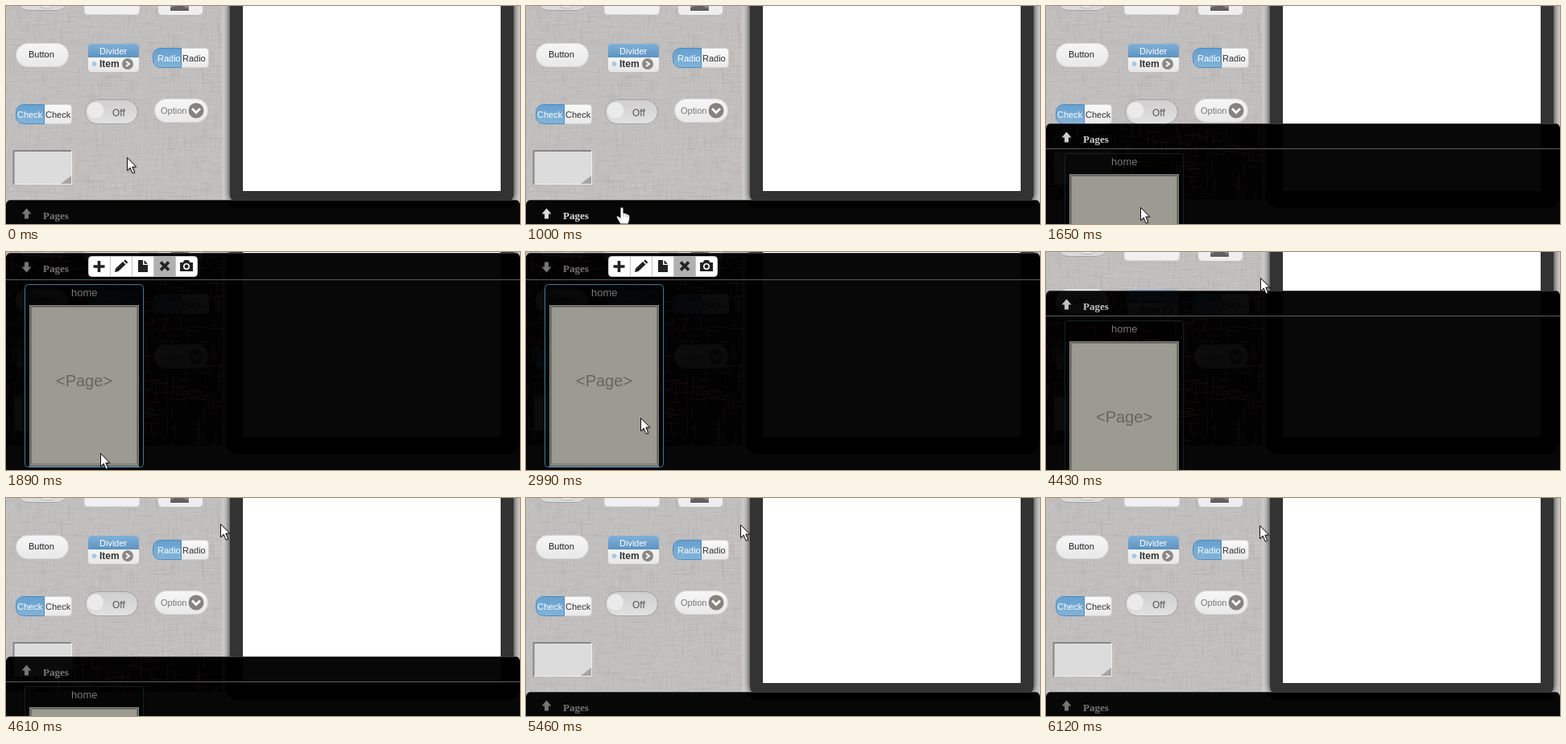
These frames come from a looping animation (638x271 px, 6180 ms). An HTML page with a canvas:

```html
<!DOCTYPE html>
<html lang="en">
<head>
<meta charset="utf-8">
<title>Pages drawer</title>
<style>
html, body { margin: 0; width: 100%; height: 100%; overflow: hidden; background: #000; }
canvas { display: block; }
</style>
</head>
<body>
<canvas id="stage" width="638" height="271"></canvas>
<script>
const W = 638, H = 271, LOOP = 6180, STEP = 60;
const SANS = '"Liberation Sans", Arial, sans-serif';
const SERIF = '"Liberation Serif", Times, serif';
const clamp = v => Math.max(0, Math.min(1, v));
const ramp = (t, start, length) => clamp((t - start) / length);
const swing = u => 0.5 - Math.cos(Math.PI * u) / 2;

function randomizer(seed) {
  return () => (seed = (seed * 16807) % 2147483647) / 2147483647;
}

function layer(draw) {
  const canvas = document.createElement('canvas');
  canvas.width = W;
  canvas.height = H;
  draw(canvas.getContext('2d'));
  return canvas;
}

function box(c, x, y, w, h, r, fill, stroke) {
  c.beginPath();
  c.roundRect(x, y, w, h, r);
  if (fill) { c.fillStyle = fill; c.fill(); }
  if (stroke) { c.strokeStyle = stroke; c.lineWidth = 1; c.stroke(); }
}

function disc(c, x, y, r, fill) {
  c.beginPath();
  c.arc(x, y, r, 0, 7);
  c.fillStyle = fill;
  c.fill();
}

function text(c, str, x, y, font, fill, align = 'center') {
  c.font = font;
  c.textAlign = align;
  c.fillStyle = fill;
  c.fillText(str, x, y);
}

function shape(c, x, y, d, fill, stroke, width = 1) {
  const path = new Path2D(d);
  c.save();
  c.translate(x, y);
  if (fill) { c.fillStyle = fill; c.fill(path); }
  if (stroke) { c.strokeStyle = stroke; c.lineWidth = width; c.stroke(path); }
  c.restore();
}

function shade(c, y, h, from, to) {
  const g = c.createLinearGradient(0, y, 0, y + h);
  g.addColorStop(0, from);
  g.addColorStop(1, to);
  return g;
}

// Short crossing threads that give the panel its cloth look.
function weave(c, count, colors, w, h) {
  const rnd = randomizer(71);
  for (let i = 0; i < count; i++) {
    const x = Math.floor(rnd() * w), y = Math.floor(rnd() * h), length = 4 + rnd() * 20;
    c.fillStyle = colors[i % colors.length];
    if (rnd() < 0.5) c.fillRect(x, y, Math.min(length, w - x), 1);
    else c.fillRect(x, y, 1, Math.min(length, h - y));
  }
}

function pair(c, x, y, label, labelX) {
  box(c, x + 0.5, y + 0.5, 69, 24, [9, 4, 4, 9], shade(c, y, 25, '#fafafa', '#e8e8e8'), '#d0d0d0');
  box(c, x + 0.5, y + 0.5, 35, 24, [9, 0, 0, 9], shade(c, y, 25, '#659fce', '#84b4da'), '#4f8cbc');
  text(c, label, labelX, y + 17, `11px ${SANS}`, '#fff', 'left');
  text(c, label, x + 37, y + 17, `11px ${SANS}`, '#333', 'left');
}

function pill(c, x, y, w, h) {
  box(c, x + 0.5, y + 0.5, w - 1, h - 1, h / 2, shade(c, y, h, '#f6f6f6', '#e8e8e8'), '#d6d6d6');
}

const widgets = layer(c => {
  box(c, 13.5, -23.5, 64, 29, 15, '#dadada', '#a4a4a4');
  box(c, 43.5, -10.5, 15, 13, 3, '#e8e8e8', '#b4b4b4');
  box(c, 97.5, -20.5, 68, 31, 4, '#f0f0f0', '#dedede');
  box(c, 189, -20, 55, 31, 5, '#eeeeee');
  box(c, 203, -12, 25, 19, 1, '#f8f8f8');
  box(c, 204, -12, 23, 18, 0, '#858383');
  shape(c, 204, 0, 'M0 6 V3 L6 0 H15 L23 4 V6Z', '#625f5f');

  pill(c, 12, 46, 66, 30);
  text(c, 'Button', 28, 64, `11px ${SANS}`, '#222', 'left');

  box(c, 102, 47, 63, 35, 4, shade(c, 63, 19, '#f6f6f6', '#e6e6e6'));
  box(c, 102, 47, 63, 17, [4, 4, 0, 0], shade(c, 47, 17, '#7db0d8', '#5f93c2'));
  text(c, 'Divider', 116, 60, `11px ${SANS}`, '#fff', 'left');
  disc(c, 109.5, 72, 3, '#a9c9e6');
  text(c, 'Item', 116, 76, `bold 12px ${SANS}`, '#333', 'left');
  disc(c, 151, 72, 7, '#8b8984');
  shape(c, 149, 69, 'M0 0 L4 3 L0 6', null, '#fff', 2);

  pair(c, 182, 52, 'Radio', 188);
  pair(c, 12, 122, 'Check', 14);

  box(c, 98.5, 116.5, 65, 30, 15, shade(c, 115, 32, '#cfcdcd', '#e2e2e2'), '#a2a2a2');
  disc(c, 111, 130, 11, '#d4d4d4');
  disc(c, 111, 130, 10.2, '#ebebeb');
  text(c, 'Off', 132, 137, `12px ${SANS}`, '#555', 'left');

  pill(c, 184, 115, 67, 30);
  text(c, 'Option', 192, 134, `11px ${SANS}`, '#777', 'left');
  disc(c, 236, 130, 9.5, '#85837e');
  shape(c, 231, 127.5, 'M0 0 L5 5 L10 0', null, '#fff', 2.8);

  box(c, 9, 179, 73, 43, 0, '#dcdcdc');
  shape(c, 9, 179, 'M0.5 43 V1 H72', null, '#858585', 2);
  shape(c, 9, 179, 'M1 42.5 H72.5 V2', null, '#efefef');
  shape(c, 68, 211, 'M13 0 V10 H0Z', '#a5a5a5');
});

const scene = layer(c => {
  c.fillStyle = '#cfcecd';
  c.fillRect(0, 0, W, H);
  c.fillStyle = '#c1bebe';
  c.fillRect(0, 0, 268, 241);
  weave(c, 2200, ['rgba(255,255,255,.06)', 'rgba(60,50,50,.035)'], 268, 241);
  c.shadowColor = '#000';
  c.shadowBlur = 9;
  box(c, 278, -30, 352, 274, 9, '#333');
  c.shadowBlur = 0;
  c.fillStyle = '#fff';
  c.fillRect(294, 0, 320, 230);
  c.drawImage(widgets, 0, 0);
});

// The same scene as it shows through the nearly opaque drawer.
const veil = layer(c => {
  c.fillStyle = '#070707';
  c.fillRect(0, 0, W, H);
  c.fillStyle = '#030202';
  c.fillRect(0, 0, 268, 241);
  weave(c, 1100, ['rgba(36,22,22,.4)', 'rgba(0,0,0,.5)'], 268, 241);
  box(c, 272, -30, 366, 281, 16, '#000');
  c.fillStyle = '#080808';
  c.fillRect(294, 0, 320, 230);
  c.filter = 'brightness(.05)';
  c.drawImage(widgets, 0, 0);
});

function toolbar(c) {
  const ink = '#222';
  box(c, 102.5, 5.5, 135, 25, 4, '#fff', '#ccc');
  c.fillStyle = '#b0b0b0';
  c.fillRect(183, 5, 27, 26);
  c.fillStyle = '#c4c4c4';
  for (const x of [129, 156, 183, 210]) c.fillRect(x, 6, 1, 24);
  shape(c, 115.5, 18, 'M-7 0 H7 M0 -7 V7', null, ink, 3.6);
  shape(c, 135, 10, 'M0 15 L1 10.5 L10 2 L13.5 5.5 L4.5 14Z M11 1 L13 -.5 L16.5 3 L14.5 4.5Z', ink);
  shape(c, 164, 10, 'M0 0 H6 V6 H12 V15 H0Z M7.5 0 L12 4.7 H7.5Z', ink);
  shape(c, 197, 17.5, 'M-5 -5 L5 5 M5 -5 L-5 5', null, ink, 3.8);
  shape(c, 216, 10, 'M0 3 H3.5 L5.5 0 H10.5 L12.5 3 H16 V14 H0Z', ink);
  disc(c, 224, 18, 4, '#fff');
  disc(c, 224, 18, 2.4, ink);
}

function card(c, line, lit) {
  const y = line + 6, top = line + 32;
  box(c, 23.5, y + 0.5, 147, 227, lit ? 4 : 2, 'rgba(0,0,0,.3)', lit ? '#3f789f' : '#142020');
  text(c, 'home', 81, line + 21, `13px ${SANS}`, '#777', 'left');
  box(c, 29, top, 136, 201, 0, '#85857e');
  box(c, 30.5, top + 1.5, 133, 198, 0, '#9b9b92', '#5e5e59');
  box(c, 31.5, top + 2.5, 131, 195, 0, null, '#77776f');
  text(c, '<Page>', 97, line + 133, `20px ${SANS}`, '#66665f');
}

function drawer(c, top, open, glow, lit) {
  const line = top + (open ? 33 : 31);
  const level = Math.round(118 + 100 * glow);
  const tone = `rgb(${level},${level},${level})`;
  c.save();
  c.beginPath();
  c.roundRect(0, top, W, 400, 6);
  c.clip();
  c.drawImage(veil, 0, 0);
  c.fillStyle = '#3a3a3a';
  c.fillRect(5, top, W - 10, 1);
  c.fillStyle = '#5c5c5c';
  c.fillRect(0, line, W, 1);
  c.save();
  c.translate(25.5, top + 17.5);
  if (open) c.scale(1, -1);
  shape(c, 0, 0, 'M0 -7 L6 0 H2.5 V6 H-2.5 V0 H-6Z', tone);
  c.restore();
  text(c, 'Pages', 46, top + 24, `bold 13px ${SERIF}`, tone, 'left');
  card(c, line, lit);
  if (open) toolbar(c);
  c.restore();
}

const ARROW = 'M.5 .5 V16.5 L4.2 13 L7 19.8 L9.6 18.7 L6.8 12 H11.6Z';
const HAND = 'M0 2 Q0 0 2 0 Q4 0 4 2 V7.5 Q6.5 6.5 7 8.3 Q9.3 7.6 9.6 9.4 Q11.8 9 11.8 11 V15 L10 21 H0 L-4 14 Q-5.4 11.4 -3.4 11 Q-1.8 11 0 13.4Z';

// time, x, y
const track = [
  [340, 150, 188], [520, 153, 196], [700, 142, 216], [880, 123, 245], [1000, 117, 250],
  [2690, 117, 250], [2870, 126, 236], [3110, 158, 175], [3350, 200, 98],
  [3530, 240, 52], [3650, 260, 36], [3770, 266, 32]
];
const nudges = [[5460, 266, 33], [5990, 266, 34], [6120, 265, 34]];

function pointer(q, t) {
  const nudge = nudges.filter(n => t >= n[0]).pop();
  if (nudge) return nudge.slice(1);
  const i = track.findIndex(p => p[0] > q);
  if (i < 0) return track[track.length - 1].slice(1);
  if (i === 0) return track[0].slice(1);
  const [t0, x0, y0] = track[i - 1], [t1, x1, y1] = track[i];
  const u = (q - t0) / (t1 - t0);
  return [Math.round(x0 + (x1 - x0) * u), Math.round(y0 + (y1 - y0) * u)];
}

const spans = [[400, 1000], [1530, 1890], [2750, 3770], [4370, 4730]];
function quantize(t) {
  let q = 0;
  for (const [a, b] of spans) {
    if (t >= a) q = Math.min(b, a + Math.floor((t - a) / STEP) * STEP);
  }
  return q;
}

const ctx = document.getElementById('stage').getContext('2d');

function render(t) {
  const q = quantize(t);
  const lift = swing(ramp(q, 1468, 420)) - swing(ramp(q, 4308, 420));
  const glow = ramp(q, 820, 180) - ramp(q, 1620, 240) + ramp(q, 3560, 180) - ramp(q, 4370, 240);
  const open = q >= 1890 && q < 4370;
  const [x, y] = pointer(q, t);
  const lit = open && y > 40 && x < 171;
  const hand = (q >= 820 && q < 1590) || (q >= 3650 && q < 4430);
  ctx.drawImage(scene, 0, 0);
  drawer(ctx, Math.round(241 - 240 * lift), open, glow, lit);
  ctx.save();
  ctx.shadowColor = 'rgba(0,0,0,.45)';
  ctx.shadowBlur = 2;
  ctx.shadowOffsetX = ctx.shadowOffsetY = 1;
  shape(ctx, x, y, hand ? HAND : ARROW, '#fff');
  ctx.restore();
  shape(ctx, x, y, hand ? HAND : ARROW, null, '#111');
  if (hand) shape(ctx, x, y, 'M4 8 V12 M7 9 V12.5 M9.6 10 V13', null, '#888', 0.7);
}

const start = performance.now();
function tick() {
  render((performance.now() - start) % LOOP);
  requestAnimationFrame(tick);
}
tick();
</script>
</body>
</html>
```
